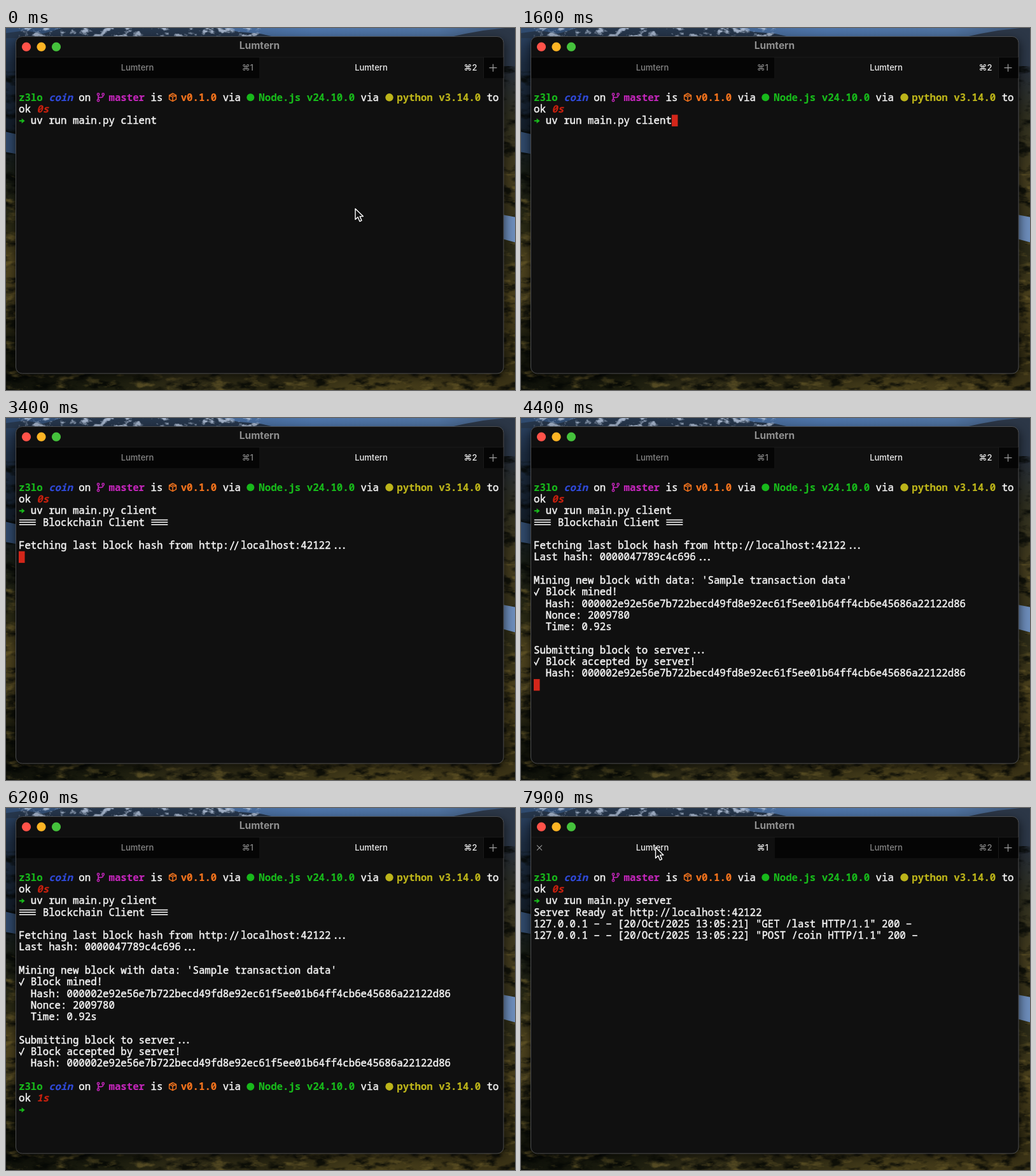
An HTML page for the animation above (8 s loop, 800x570 px).

```html
<!DOCTYPE html>
<html lang="en">
<head>
<meta charset="utf-8">
<title>Terminal</title>
<style>
  html, body { margin: 0; width: 100%; height: 100%; overflow: hidden; background: #101010; }
  svg { position: absolute; left: 0; top: 0; width: 800px; height: 570px; }
  #backdrop { will-change: transform; }
  .mono {
    font: 500 15.72px "Noto Sans Mono", "DejaVu Sans Mono", monospace;
    font-variant-ligatures: none; white-space: pre;
    fill: currentColor; stroke: currentColor; stroke-width: .5;
  }
  .bold { font-weight: 700; stroke-width: .15; }
  .slant { font-style: italic; }
  .ui { font: 500 13px Inter, "Open Sans", sans-serif; }
</style>
</head>
<body>
<svg id="backdrop" viewBox="0 0 800 570">
  <defs>
    <linearGradient id="sky">
      <stop offset="0" stop-color="#2f4a6e"/><stop offset=".35" stop-color="#41618c"/>
      <stop offset=".6" stop-color="#4d74a8"/><stop offset=".85" stop-color="#4f729f"/><stop offset="1" stop-color="#3a506f"/>
    </linearGradient>
    <linearGradient id="west" x2="0" y2="1">
      <stop offset="0" stop-color="#2d4566"/><stop offset=".1" stop-color="#1d2c40"/>
      <stop offset=".27" stop-color="#141f2c"/><stop offset=".4" stop-color="#181d15"/>
      <stop offset=".56" stop-color="#2b2a14"/><stop offset=".64" stop-color="#50451f"/>
      <stop offset=".78" stop-color="#3f381b"/><stop offset=".86" stop-color="#17180c"/><stop offset="1" stop-color="#0e1009"/>
    </linearGradient>
    <linearGradient id="east" x2="0" y2="1">
      <stop offset="0" stop-color="#303d50"/><stop offset=".12" stop-color="#272e38"/>
      <stop offset=".24" stop-color="#2f2f20"/><stop offset=".42" stop-color="#443c1e"/>
      <stop offset=".62" stop-color="#2b2a17"/><stop offset=".74" stop-color="#4a401c"/>
      <stop offset=".9" stop-color="#332d14"/><stop offset="1" stop-color="#29250f"/>
    </linearGradient>
    <linearGradient id="ground">
      <stop offset="0" stop-color="#0f110a"/><stop offset=".22" stop-color="#1d1e0f"/>
      <stop offset=".35" stop-color="#343019"/><stop offset=".5" stop-color="#2a2713"/>
      <stop offset=".72" stop-color="#483f1b"/><stop offset="1" stop-color="#3a3216"/>
    </linearGradient>
    <filter id="soft"><feGaussianBlur stdDeviation=".7"/></filter>
    <filter id="shade" x="-10%" y="-10%" width="120%" height="120%"><feGaussianBlur stdDeviation="8"/></filter>
    <filter id="rocks" x="0" y="0" width="1" height="1" color-interpolation-filters="sRGB">
      <feTurbulence type="fractalNoise" baseFrequency=".035 .07" numOctaves="4" seed="5"/>
      <feColorMatrix values="0 0 0 0 .02  0 0 0 0 .03  0 0 0 0 .02  4 0 0 0 -1.9"/>
    </filter>
    <filter id="grass" x="0" y="0" width="1" height="1" color-interpolation-filters="sRGB">
      <feTurbulence type="fractalNoise" baseFrequency=".04 .09" numOctaves="4" seed="9"/>
      <feColorMatrix values="0 0 0 0 .5  0 0 0 0 .43  0 0 0 0 .2  0 4 0 0 -2.2"/>
    </filter>
    <filter id="snow" x="0" y="0" width="1" height="1" color-interpolation-filters="sRGB">
      <feTurbulence type="fractalNoise" baseFrequency=".07 .11" numOctaves="4" seed="3"/>
      <feColorMatrix values="0 0 0 0 .72  0 0 0 0 .78  0 0 0 0 .87  6 0 0 0 -3.1"/>
    </filter>
  </defs>
  <g id="wallpaper"></g>
</svg>
<svg viewBox="0 0 800 570">
  <g id="frame"></g>
  <g id="tabs"></g>
  <g id="client"></g>
  <g id="server"></g>
  <rect id="caret" width="9.5" height="18.3" fill="#d3261a"/>
  <path id="pointer" d="M0 0V17L4 13.3L6.9 20L10 18.6L7.2 12.1H12.4Z" fill="#111" stroke="#fff" stroke-width="1.4" stroke-linejoin="round"/>
</svg>
<script>
const LOOP = 8000;
const CELL = 9.432, LINE = 18.3, LEFT = 20, BASE = 114.6;
const C = {
  white: '#f2f2f2', green: '#18b91b', blue: '#304bdb', magenta: '#c226b9',
  orange: '#f3731d', yellow: '#bcb41a', red: '#c7210f'
};
const APP = 'Lumtern', USER = 'z3lo';
const HASH = '000002e92e56e7b722becd49fd8e92ec61f5ee01b64ff4cb6e45686a22122d86';
const $ = id => document.getElementById(id);

function add(parent, tag, attrs = {}, text) {
  const el = document.createElementNS('http://www.w3.org/2000/svg', tag);
  for (const key in attrs) el.setAttribute(key, attrs[key]);
  if (text !== undefined) el.textContent = text;
  parent.append(el);
  return el;
}
const rect = (g, x, y, width, height, fill, more = {}) =>
  add(g, 'rect', { x, y, width, height, fill, ...more });
const dot = (g, cx, cy, r, fill, more = {}) => add(g, 'circle', { cx, cy, r, fill, ...more });
const line = (g, d, stroke, width = 1, more = {}) =>
  add(g, 'path', { d, stroke, 'stroke-width': width, fill: 'none', ...more });
const show = (el, on) => { el.style.display = on ? '' : 'none'; };

const colX = col => LEFT + col * CELL;
const rowY = row => BASE + row * LINE;

// --- Wallpaper ---
function drawWallpaper(g) {
  rect(g, 0, 0, 400, 570, 'url(#west)');
  rect(g, 400, 0, 400, 570, 'url(#east)');
  rect(g, 0, 542, 800, 28, 'url(#ground)');
  rect(g, 0, 60, 800, 510, '#000', { filter: 'url(#rocks)', opacity: .8 });
  rect(g, 0, 230, 800, 340, '#000', { filter: 'url(#grass)', opacity: .55 });

  rect(g, 0, 0, 800, 16, 'url(#sky)');
  const soft = add(g, 'g', { filter: 'url(#soft)' });
  add(soft, 'path', { d: 'M0 16V8L30 4L58 9L95 -2H330L365 6L400 9L430 16Z', fill: '#26364b' });
  add(soft, 'path', { d: 'M690 16L722 9L750 4L802 -2V60H782V16Z', fill: '#2c3747' });
  add(soft, 'path', { d: 'M-2 163L20 168V199L-2 195Z', fill: '#30496a' });
  add(soft, 'path', { d: 'M780 294L802 298V338L780 332Z', fill: '#6d8dbb' });
  rect(g, 20, 0, 390, 14, '#000', { filter: 'url(#snow)', opacity: .85 });

  rect(g, 14, 18, 770, 532, '#000', { rx: 12, opacity: .6, filter: 'url(#shade)' });
}

// --- Window ---
function drawFrame(g) {
  rect(g, 15.5, 13.5, 766.5, 530.5, '#101010', { rx: 10, stroke: '#4c4d4f' });
  ['#ff5249', '#fdb424', '#45c23c'].forEach((fill, i) => dot(g, 32 + i * 23.5, 29.7, 7.1, fill));
  add(g, 'text', {
    class: 'ui', x: 398.5, y: 32.8, fill: '#8f8f8f', 'text-anchor': 'middle',
    style: 'font-size:15.5px;font-weight:700'
  }, APP);
}

function drawTabs(g) {
  const makeTab = (x, width, center, keyX, key) => {
    const shade = rect(g, x, 46, width, 33, '#050505');
    const name = add(g, 'text', { class: 'ui', x: center, y: 67, 'text-anchor': 'middle' }, APP);
    const hint = add(g, 'text', { class: 'ui', x: keyX, y: 67, 'text-anchor': 'end' }, key);
    return active => {
      show(shade, !active);
      name.setAttribute('fill', active ? '#ededed' : '#858585');
      hint.setAttribute('fill', active ? '#ededed' : '#858585');
    };
  };
  const first = makeTab(16, 382, 206.5, 389, '⌘1');
  const second = makeTab(399, 351, 574, 740.5, '⌘2');
  rect(g, 750.5, 46, 31, 33, '#050505');
  line(g, 'M16 46H781M750.5 46V79', '#1b1b1b');
  line(g, 'M759.5 62.7H771.5M765.5 56.7V68.7', '#a0a0a0', 1.2);
  const close = line(g, 'M25 58.7L33 66.7M33 58.7L25 66.7', '#9a9a9a', 1.1);
  return { first, second, close };
}

// --- Terminal text ---
function put(g, row, col, text, color = C.white, style = '') {
  add(g, 'text', { class: 'mono ' + style, x: colX(col), y: rowY(row), color }, text);
}

// Joined glyphs, the tick and the wide dash are drawn as shapes.
function write(g, row, text) {
  let col = 0;
  const y = rowY(row);
  for (const part of text.split(/(===|\/\/|\.\.\.|√|-)/)) {
    const x = colX(col);
    if (part === '===') {
      for (const dy of [-9, -5.3, -1.6]) rect(g, x + .8, y + dy - .8, 26, 1.6, C.white);
    } else if (part === '//') {
      line(g, `M${x + 2.4} ${y + 2}L${x + 8.2} ${y - 12}M${x + 9} ${y + 2}L${x + 14.8} ${y - 12}`, C.white, 1.7);
    } else if (part === '...') {
      for (const dx of [7.7, 14.2, 20.7]) dot(g, x + dx, y - 1.2, 1.4, C.white);
    } else if (part === '√') {
      line(g, `M${x + 1} ${y - 5}L${x + 3.6} ${y - .6}L${x + 8.4} ${y - 11.5}`, C.white, 1.7);
    } else if (part === '-') {
      line(g, `M${x + 1} ${y - 5.2}H${x + 8.6}`, C.white, 1.7);
    } else if (part.trim()) {
      put(g, row, col, part);
    }
    col += part.length;
  }
}

function drawPrompt(g, row, took) {
  const spans = [
    [0, USER, C.green, 'bold'], [5, 'coin', C.blue, 'bold slant'], [10, 'on'],
    [15, 'master', C.magenta, 'bold'], [22, 'is'], [27, 'v0.1.0', C.orange, 'bold'],
    [34, 'via'], [40, 'Node.js v24.10.0', C.green, 'bold'], [57, 'via'],
    [63, 'python v3.14.0', C.yellow, 'bold'], [78, 'to']
  ];
  for (const span of spans) put(g, row, ...span);
  put(g, row + 1, 0, 'ok');
  put(g, row + 1, 3, took, C.red, 'bold slant');

  const icons = add(g, 'g', { transform: `translate(0 ${row * LINE})` });
  for (const [x, y] of [[145, 104.5], [152.6, 104.5], [145, 114]])
    dot(icons, x, y, 1.7, 'none', { stroke: C.magenta, 'stroke-width': 1.5 });
  line(icons, 'M145 106.5V112M152.6 106.5Q152.6 109.4 149 109.4H145', C.magenta, 1.7);
  line(icons, 'M262 103L267.4 105.8V112.4L262 115.3L256.6 112.4V105.8ZM256.6 105.8L262 108.7L267.4 105.8M262 108.7V115.3M259.3 104.4L264.7 107.3',
    C.orange, 1.5, { 'stroke-linejoin': 'round' });
  dot(icons, 384.3, 109.3, 6, C.green);
  dot(icons, 602.5, 109.3, 6.2, C.yellow);

  const y = rowY(row + 2) - 5;
  line(g, `M20.8 ${y}H26.5`, C.green, 2.1);
  add(g, 'path', { d: `M24.6 ${y - 4}L29.6 ${y}L24.6 ${y + 4}Z`, fill: C.green });
}

const CLIENT = [
  // time, first row, lines
  [3250, 3, ['=== Blockchain Client ===', '', 'Fetching last block hash from http://localhost:42122...']],
  [3450, 6, ['Last hash: 0000047789c4c696...', '', "Mining new block with data: 'Sample transaction data'"]],
  [4370, 9, ['√ Block mined!', '  Hash: ' + HASH, '  Nonce: 2009780', '  Time: 0.92s', '',
    'Submitting block to server...', '√ Block accepted by server!', '  Hash: ' + HASH]]
];
const ENTER = 2900, DONE = 4500, SWITCH = 7700;

function drawClient(g) {
  const block = at => ({ at, el: add(g, 'g') });
  drawPrompt(g, 0, '0s');
  write(g, 2, '  uv run main.py client');
  const blocks = CLIENT.map(([at, row, lines]) => {
    const b = block(at);
    lines.forEach((text, i) => write(b.el, row + i, text));
    return b;
  });
  const last = block(DONE);
  drawPrompt(last.el, 18, '1s');
  return [...blocks, last];
}

function drawServer(g) {
  drawPrompt(g, 0, '0s');
  ['  uv run main.py server',
    'Server Ready at http://localhost:42122',
    '127.0.0.1 - - [20/Oct/2025 13:05:21] "GET /last HTTP/1.1" 200 -',
    '127.0.0.1 - - [20/Oct/2025 13:05:22] "POST /coin HTTP/1.1" 200 -'
  ].forEach((text, i) => write(g, 2 + i, text));
}

// --- Timeline ---
const CARET = [
  // time, row, column
  [0, 2, 23], [ENTER, 3, 0], [3250, 6, 0], [3450, 9, 0], [4370, 17, 0], [DONE, 20, 2], [SWITCH, 6, 0]
];
const HIDE = 300, MOVE = 6450, ARRIVE = 7150;
const BLINK = 1200;

drawWallpaper($('wallpaper'));
drawFrame($('frame'));
const tabs = drawTabs($('tabs'));
const blocks = drawClient($('client'));
drawServer($('server'));

function render(t) {
  const onServer = t >= SWITCH;
  tabs.first(onServer);
  tabs.second(!onServer);
  show($('client'), !onServer);
  show($('server'), onServer);
  for (const { at, el } of blocks) show(el, t >= at);

  const [, row, col] = CARET.findLast(([at]) => t >= at);
  const phase = t < ENTER ? 350 : 750;
  show($('caret'), (t - phase + BLINK) % BLINK < BLINK / 2);
  $('caret').setAttribute('x', colX(col));
  $('caret').setAttribute('y', 100 + row * LINE);

  const k = Math.min(1, Math.max(0, (t - MOVE) / (ARRIVE - MOVE)));
  const ease = k * k * (3 - 2 * k);
  const x = 549 + (211.5 - 549) * ease, y = 284.5 + (62 - 284.5) * ease;
  $('pointer').setAttribute('transform', `translate(${x} ${y})`);
  show($('pointer'), t < HIDE || t >= MOVE);
  show(tabs.close, t >= MOVE && y < 79 && x < 398);
}

const start = performance.now();
function tick(now) {
  render(Math.max(0, now - start) % LOOP);
  requestAnimationFrame(tick);
}
render(0);
requestAnimationFrame(tick);
</script>
</body>
</html>
```
